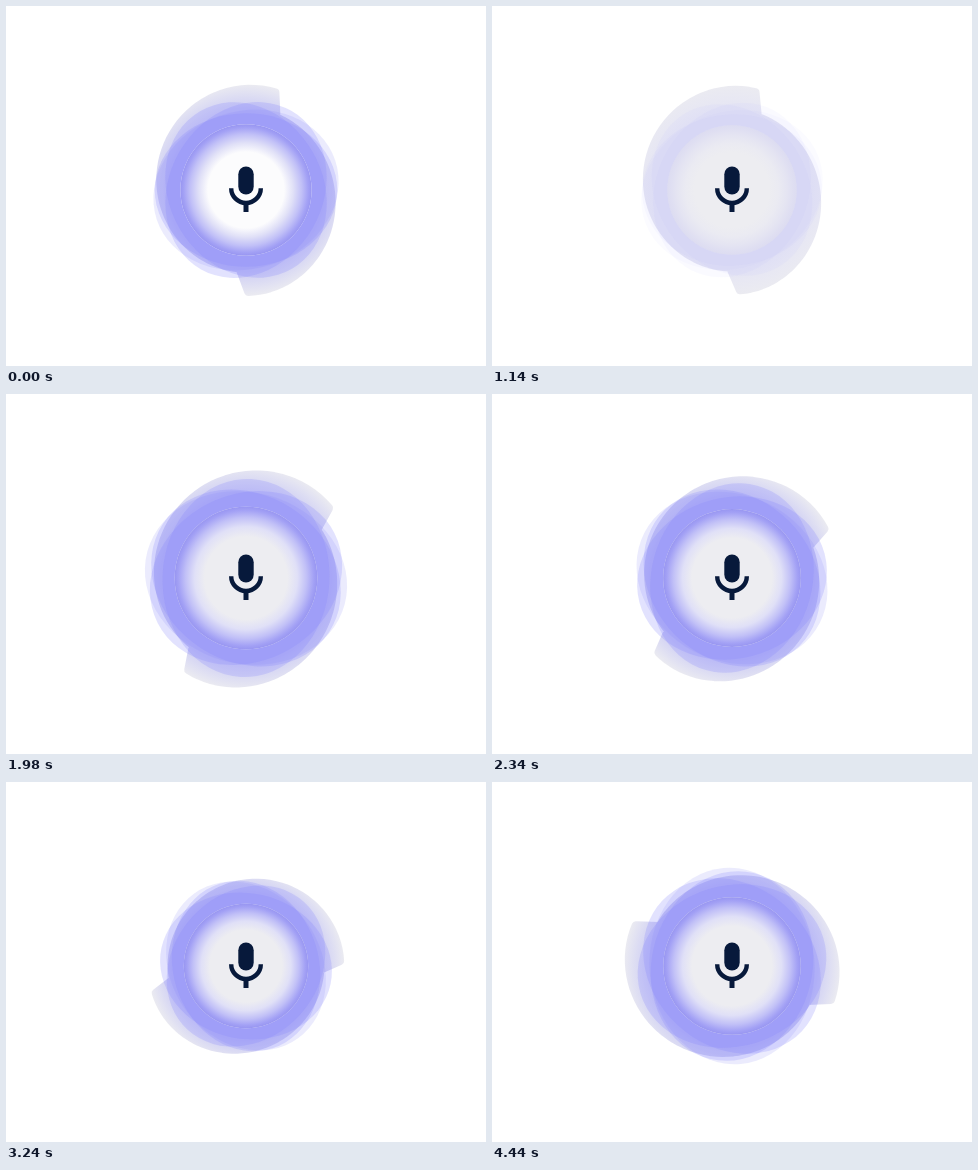
Write an HTML page with a canvas that moves like this. It is 480x360 px and loops after 4.5 s.

```html
<!DOCTYPE html>
<html lang="en">
<head>
<meta charset="utf-8">
<title>Microphone pulse</title>
<style>
  html, body { margin: 0; width: 100%; height: 100%; overflow: hidden; background: #fff; }
  canvas { display: block; width: 480px; height: 360px; }
</style>
</head>
<body>
<canvas id="stage" width="480" height="360"></canvas>
<script>
const ctx = document.getElementById('stage').getContext('2d');
const LOOP = 4500, CX = 240, CY = 184, INK = '#07193b';
const WAKE = 840, RAMP = 690;       // the pulse returns, then gains full colour
const PEAK = 1700, SWELL = 3400;    // breathing of the disc
const rad = d => d * Math.PI / 180;
const mix = (a, b, u) => a + (b - a) * u;
const smooth = u => u * u * (3 - 2 * u);
const clamp = u => Math.max(0, Math.min(1, u));
const ramp = t => clamp((t - WAKE) / RAMP) ** 2;

function poseAt(t) {
  const u = clamp((t - WAKE) / (LOOP - 60 - WAKE));
  const small = 1 - ramp(t);
  const r = 67 + 5 * Math.cos(2 * Math.PI * (t - PEAK) / SWELL) - 6 * small;
  return {
    r,
    tipR: 1.58 * r + 3 * small,
    turn: -110 + 133 * u ** 0.65,
    skew: 9 - 11 * u ** 4
  };
}

function fadeAt(t) {
  if (t < 60) return t < 30 ? 1 : 0.5;
  return ramp(t);
}

// Two spiral blades with rounded tips, tinted near the body
function blades({ r, tipR, turn, skew }, fade, light) {
  const tips = [turn + skew, turn - skew + 180, turn + skew + 360];
  const baseR = r * 1.26;
  ctx.beginPath();
  for (let i = 0; i < 2; i++) {
    for (let k = 0; k <= 50; k++) {
      const u = k / 50;
      const a = rad(mix(tips[i] + 4, tips[i + 1] - 2, u));
      const d = mix(baseR, tipR, smooth(u ** 1.3)) - 4;
      ctx.lineTo(d * Math.cos(a), d * Math.sin(a));
    }
  }
  ctx.closePath();
  const tone = (...rgb) => `rgb(${rgb.map(v => Math.round(mix(255, v, light)))})`;
  const g = ctx.createRadialGradient(0, 0, r * 1.2, 0, 0, tipR);
  g.addColorStop(0, tone(mix(234, 204, fade), mix(234, 203, fade), 244));
  g.addColorStop(0.5, tone(mix(235, 219, fade), mix(235, 219, fade), 243));
  g.addColorStop(1, tone(235, 235, 241));
  ctx.fillStyle = ctx.strokeStyle = g;
  ctx.lineWidth = 8;
  ctx.lineJoin = 'round';
  ctx.fill();
  ctx.stroke();
}

function oval(a, b, deg, fill) {
  ctx.beginPath();
  ctx.ellipse(0, 0, a, b, rad(deg), 0, 2 * Math.PI);
  ctx.fillStyle = fill;
  ctx.fill();
}

function disc(r, core) {
  const g = ctx.createRadialGradient(0, 0, 0, 0, 0, r);
  g.addColorStop(0, core);
  g.addColorStop(0.58, core);
  g.addColorStop(0.72, '#e0e0f7');
  g.addColorStop(0.85, '#c1c0f7');
  g.addColorStop(0.95, '#a3a1f5');
  g.addColorStop(1, '#9896f1');
  oval(r, r, 0, g);
}

function mic() {
  ctx.fillStyle = ctx.strokeStyle = INK;
  ctx.beginPath();
  ctx.roundRect(232.3, 160.5, 15.4, 28, 7.7);
  ctx.fill();
  ctx.beginPath();
  ctx.arc(240, 182.2, 14.8, 0, Math.PI);
  ctx.lineWidth = 4.4;
  ctx.stroke();
  ctx.fillRect(237.5, 197, 5, 9);
}

function draw(t) {
  const opening = t < 60;
  const fade = fadeAt(t), light = clamp(fade * 6);
  const pose = poseAt(opening ? 1200 : t);
  const core = opening ? '#fcfcfd' : '#ededf1';
  ctx.fillStyle = '#fff';
  ctx.fillRect(0, 0, 480, 360);
  if (fade > 0) {
    const { r, turn } = pose, a = r * 1.39;
    ctx.save();
    ctx.translate(CX, CY);
    blades(pose, fade, light);
    ctx.globalAlpha = fade;
    oval(a * 1.03, r * 1.2, turn + 62, 'rgba(130,128,240,.16)');
    for (let i = 0; i < 3; i++) oval(a, r * 1.17, turn + 20 + i * 60, 'rgba(130,128,250,.23)');
    ctx.globalAlpha = light;
    oval(r, r, 0, core);
    ctx.globalAlpha = fade;
    disc(r, core);
    ctx.restore();
  }
  mic();
}

const start = performance.now();
function tick() {
  draw((performance.now() - start) % LOOP);
  requestAnimationFrame(tick);
}
tick();
</script>
</body>
</html>
```
